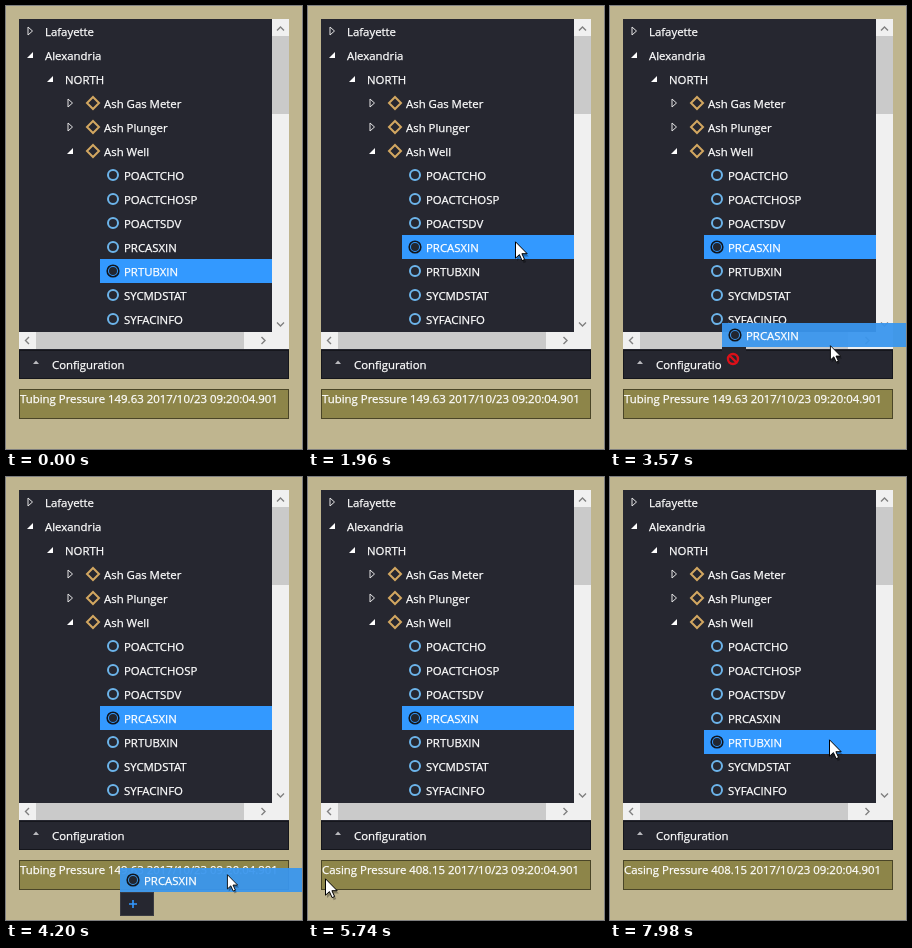
These frames come from a looping animation (296x443 px, 8000 ms). An HTML page:

```html
<!DOCTYPE html>
<html lang="en">
<head>
<meta charset="utf-8">
<title>Drag a tag onto a value</title>
<style>
  html, body { margin: 0; width: 100%; height: 100%; overflow: hidden; background: #bfb58f; }
  svg { display: block; width: 296px; height: 443px; }
  text {
    font: 11.4px "Open Sans", "Noto Sans", sans-serif;
    fill: #fff; stroke: #fff; stroke-width: .25px; white-space: pre;
  }
  .chev { fill: none; stroke: #808080; stroke-width: 1.4; }
</style>
</head>
<body>
<svg viewBox="0 0 296 443">
  <rect width="296" height="443" fill="#bfb58f"/>
  <rect x="13" y="13" width="270" height="360" fill="#262730"/>
  <g id="tree"></g>

  <path d="M266 13h17v330H13v-17h253z" fill="#f0f0f0"/>
  <path d="M266 30h17v78h-17zM30 326h208v17H30z" fill="#cacaca"/>
  <path class="chev" d="M271 24.5l3.5-3.5 3.5 3.5M271 316.5l3.5 3.5 3.5-3.5M23 331l-3.5 3.5 3.5 3.5M255.5 331l3.5 3.5-3.5 3.5"/>

  <rect x="13.5" y="344.5" width="269" height="28" fill="none" stroke="#15161c"/>
  <path d="M27 358h6l-3-3.5z" fill="#b9b9bd"/>
  <text x="46" y="362.5">Configuration</text>

  <rect x="13.5" y="383.5" width="269" height="29" fill="#8d8549" stroke="#4a4527"/>
  <text id="value" x="14" y="397"></text>

  <g id="ghost">
    <rect width="200" height="24" fill="#3a96ee" opacity=".94"/>
    <g id="ghostRow"></g>
    <g id="deny">
      <rect y="24" width="24" height="24" fill="#262730"/>
      <path d="M7.5 32.5l7 7M16 36a5 5 0 1 0-10 0a5 5 0 1 0 10 0" fill="none" stroke="#dc1019" stroke-width="2.4"/>
    </g>
    <g id="allow">
      <rect x=".5" y="24.5" width="33" height="23" fill="#262730" stroke="#3a3b42"/>
      <path d="M9 36h8M13 32v8" stroke="#3399ff" stroke-width="1.6"/>
    </g>
  </g>

  <g id="cursor">
    <path d="M2 3v17l4-3.700 2.700 6 2.500-1.200-2.600-5.700h5.300z" opacity=".3"/>
    <path d="M.5 .8v16.400l3.900-3.600 2.700 6 2.500-1.100-2.700-5.800h5.300z" fill="#fff" stroke="#000"/>
  </g>
</svg>
<script>
const LOOP = 8000, STEP = 70;
const ENTER = 350, PICK = 1960, GRAB = 3010, OVER = 3850, DROP = 4620, REPICK = 7840;
const $ = id => document.getElementById(id);

// Group names carry a depth; the rest are tags below the last group.
const groups = [
  ['Lafayette', 0], ['Alexandria', 0, 'open'], ['NORTH', 1, 'open'],
  ['Ash Gas Meter', 2], ['Ash Plunger', 2], ['Ash Well', 2, 'open']
];
const tags = 'POACTCHO POACTCHOSP POACTSDV PRCASXIN PRTUBXIN SYCMDSTAT SYFACINFO'.split(' ');
const rowY = i => 25 + 24 * i;

const label = (x, y, s) => `<text x="${x}" y="${y + 4.5}">${s}</text>`;
const circle = (x, y, r, look) => `<circle cx="${x}" cy="${y}" r="${r}" ${look}/>`;
const ring = (x, y) => circle(x, y, 5, 'fill="none" stroke="#6cb4ea" stroke-width="2"');
const picked = (x, y) =>
  circle(x, y, 5.8, 'fill="none" stroke="#10141b" stroke-width="1.6"') +
  circle(x, y, 4, 'fill="#22262f"');
const diamond = (x, y) =>
  `<path d="M${x} ${y - 6}l6 6-6 6-6-6z" fill="none" stroke="#d2a761" stroke-width="2"/>`;
const arrow = (x, y, open) => open
  ? `<path d="M${x + 3} ${y - 3}v6h-6z" fill="#fff"/>`
  : `<path d="M${x - 2} ${y - 4}l4.5 4-4.5 4z" fill="none" stroke="#e4e4e4"/>`;

function groupRow([name, depth, open], i) {
  const x = 24 + 20 * depth, y = rowY(i), well = depth === 2;
  return arrow(x, y, open) + (well ? diamond(87, y) : '') + label(x + (well ? 34 : 15), y, name);
}

function tagRow(name, i, pick) {
  const y = rowY(groups.length + i), on = name === pick;
  const bar = on ? `<rect x="94" y="${y - 12}" width="172" height="24" fill="#3399ff"/>` : '';
  return bar + (on ? picked : ring)(107, y) + label(118, y, name);
}

// Each stroke eases from the previous stop: [start, end, x, y, sideways bow]
const strokes = [
  [280, 840, 223, 250], [1120, 1400, 199, 228], [1680, 1750, 207, 235],
  [2940, 4000, 221, 397, 4], [4550, 5390, 98, 408], [5390, 5740, 17, 401],
  [5880, 6230, 75, 408], [6230, 6580, 20, 409],
  [6720, 7070, 177, 346], [7070, 7560, 191, 257], [7770, 7980, 219, 262]
];
const ease = p => p * p * (3 - 2 * p);

function cursorAt(t) {
  let x = 296, y = 241;
  for (const [start, end, toX, toY, bow = 0] of strokes) {
    if (t <= start) break;
    const p = Math.min(1, (t - start) / (end - start)), e = ease(p);
    x += (toX - x) * e + bow * 4 * p * (1 - p);
    y += (toY - y) * e;
  }
  return [Math.round(x), Math.round(y)];
}

const show = (id, on) => $(id).setAttribute('visibility', on ? 'inherit' : 'hidden');
const move = (id, x, y, scale = 1) =>
  $(id).setAttribute('transform', `translate(${x} ${y}) scale(${scale})`);

let lastPick;
function draw(now) {
  const t = Math.floor(now % LOOP / STEP) * STEP;
  const dragging = t >= GRAB && t < DROP;
  const pick = t >= PICK && t < REPICK ? 'PRCASXIN' : 'PRTUBXIN';
  if (pick !== lastPick) {
    $('tree').innerHTML = groups.map(groupRow).join('') +
      tags.map((name, i) => tagRow(name, i, pick)).join('');
    lastPick = pick;
  }
  $('value').textContent = (t < DROP ? 'Tubing Pressure 149.63' : 'Casing Pressure 408.15') +
    ' 2017/10/23 09:20:04.901';

  const [x, y] = cursorAt(t);
  show('cursor', t >= ENTER);
  move('cursor', x, y, dragging ? 0.87 : 1);

  // The dragged row trails the cursor by one step.
  const [gx, gy] = cursorAt(t - STEP);
  show('ghost', dragging);
  move('ghost', gx - 107, gy - 6);
  for (const [id, on] of [['deny', t < OVER], ['allow', t >= OVER]]) show(id, dragging && on);
}

$('ghostRow').innerHTML = picked(13, 12) + label(24, 12, 'PRCASXIN');
const start = performance.now();
function tick() {
  draw(performance.now() - start);
  requestAnimationFrame(tick);
}
tick();
</script>
</body>
</html>
```
